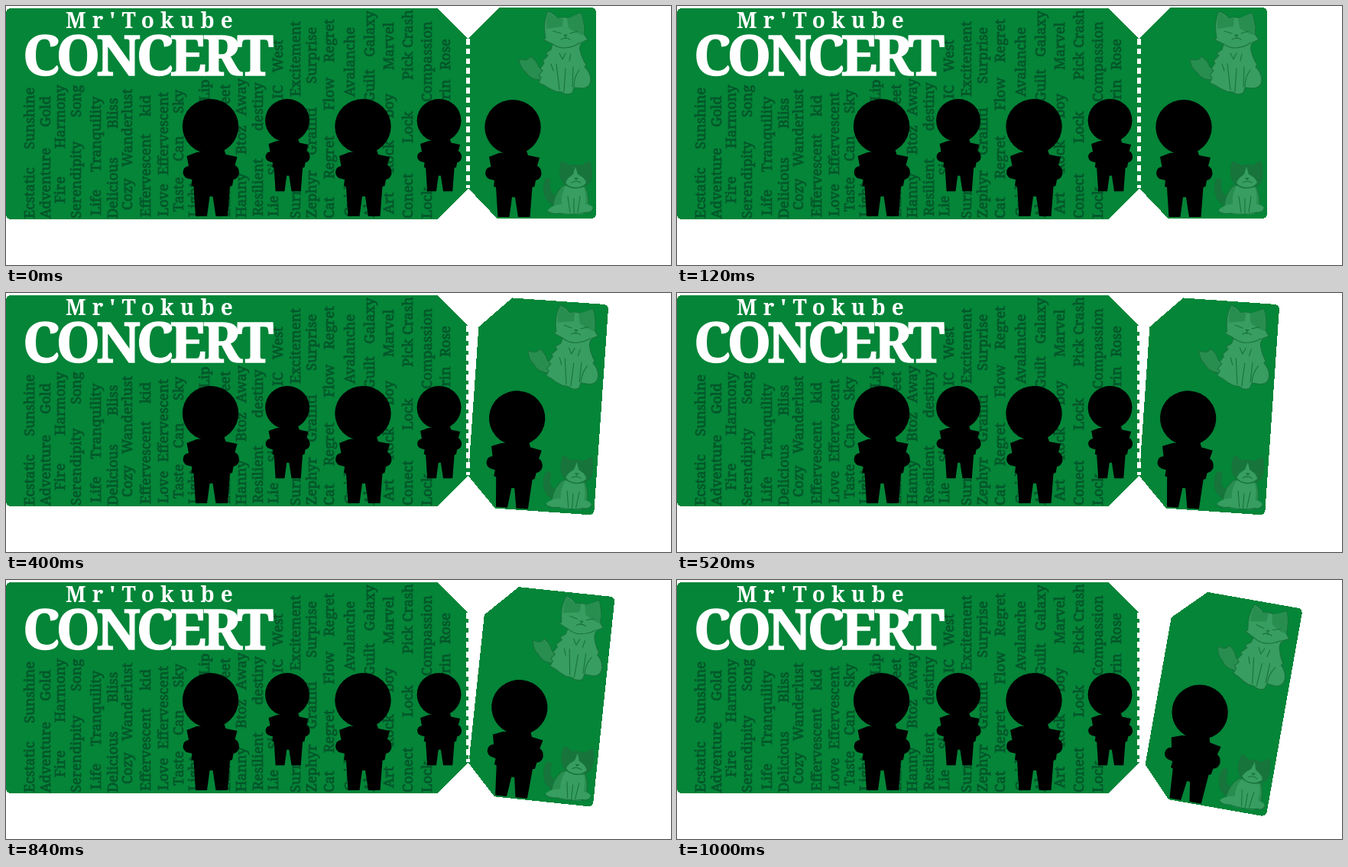
Animation of 870x340 px, one loop 1.2 s. Source, as an HTML page:

```html
<!DOCTYPE html>
<html lang="en">
<head>
<meta charset="utf-8">
<title>Concert ticket</title>
<style>
  html, body { margin: 0; width: 100%; height: 100%; overflow: hidden; background: #fff; }
  svg { display: block; width: 870px; height: 340px; }
  text { font-family: "Noto Serif", "Liberation Serif", serif; }
  .ticket { fill: #048538; shape-rendering: crispEdges; }
  .title { fill: #fff; font-weight: bold; }
  #words { fill: #03572a; stroke: #03572a; stroke-width: .8; font-size: 18.4px; }
  .cat { stroke: #18733b; stroke-width: 1.1; stroke-linejoin: round; stroke-linecap: round; }
  .light { fill: #379d60; }
  .mid { fill: #288e50; }
  .dark { fill: #17753c; }
  .patch { stroke: none; }
  .line { fill: none; }
</style>
</head>
<body>
<svg viewBox="0 0 870 340">
  <defs>
    <g id="person">
      <ellipse cy="36" rx="36.7" ry="36"/>
      <path d="M-18 70 L-31 75 -28.500 88 Q-36 89 -36 97 Q-35 104 -27 105 L-24 106 -25 114 -22 115
        -19.500 154 H-4.500 L-1 128 H3 L7 154 H22.500 L25.500 115 28.500 114 30 106
        Q37 104 37.500 97 Q37 89 32 87 L35 76 20 73 18 67Z"/>
    </g>
  </defs>

  <path class="ticket" d="M7 3 H564 L605 44 V239 L564 280 H7 Q0 280 0 273 V10 Q0 3 7 3Z"/>
  <g id="words"></g>
  <text class="title" x="78" y="29" font-size="28" letter-spacing="8">Mr'Tokube</text>
  <text class="title" x="22" y="91" font-size="73" letter-spacing="-5" stroke="#fff" stroke-width="1.500">CONCERT</text>
  <use href="#person" transform="translate(267.500 122)"/>
  <use href="#person" transform="translate(368 122) scale(.788)"/>
  <use href="#person" transform="translate(467 122)"/>
  <use href="#person" transform="translate(566.500 122) scale(.788)"/>

  <g id="stub">
    <path class="ticket" d="M604.500 43 L645.500 2 H765 Q772 2 772 9 V272 Q772 279 765 279 H642.500 L604.500 239Z"/>
    <use href="#person" transform="translate(663 123)"/>

    <g class="cat">
      <path class="mid" d="M704 97 Q686 98 680 87 Q673 82 671 70 L679 71 Q683 71 686 66 Q694 71 697 80 L704 86Z"/>
      <path class="light" d="M706 42 Q702 22 709 7 Q716 9 722 16 Q731 13 739 17 Q746 10 752 9
        Q758 25 756 37 L761 44 753 48 Q750 53 751 58 Q754 70 759 77 L757 80 Q764 86 765 96
        Q765 107 755 108 L743 107 741 114 Q734 118 727 113 L719 112 Q711 109 704 104
        L697 101 700 94 697 91 702 85 699 82 704 75 702 72 709 65 706 62 713 57 715 50 703 44Z"/>
      <path class="mid patch" d="M734 17 Q746 11 752 10 Q757 24 755 38 Q746 36 736 29Z"/>
      <path class="mid patch" d="M707 30 Q706 14 710 8 L722 17 729 15 728 27 Q718 28 707 30Z"/>
      <path class="line" d="M716 33 l10 3 M738 36 l10 -3 M730 38 h4 l-2 2z M732 40 v3 M726 44 q6 -4 12 0
        M715 50 q8 5 14 5 q12 0 22 -7 M720 76 l4 34 M732 82 l-2 30 M742 80 l-1 26 M750 84 q-7 9 -7 22
        M713 76 l3 9 M724 62 l4 8 4 -8 M739 63 l-2 9"/>
    </g>

    <g class="cat">
      <path class="dark" d="M719 262 Q706 258 704 245 Q702 235 706 227 Q710 225 712 229 Q709 247 721 250Z"/>
      <path class="mid" d="M728 236 Q717 247 716 262 L712 266 722 272 H758 L768 267 762 260 Q763 245 756 234Z"/>
      <path class="light patch" d="M732 236 Q726 247 727 260 Q712 262 708 269 Q712 274 724 272 Q731 275 743 273
        Q753 275 758 271 Q766 272 768 266 Q767 261 758 260 Q760 247 755 236Z"/>
      <path class="dark" d="M725 223 Q724 210 727 204 Q733 206 737 210 Q745 207 754 210 Q759 205 764 204
        Q767 216 766 225 Q765 237 747 239 Q729 239 725 223Z"/>
      <path class="light patch" d="M745 211 L748 221 Q757 225 759 232 Q754 238 746 238 Q736 238 732 232
        Q735 225 742 221Z"/>
      <path class="line" d="M731 220 l8 3 M752 223 l8 -3 M744 226 h4 l-2 2z M740 232 q6 -4 12 0
        M735 250 l3 21 M751 250 l-3 21 M743 253 v19 M708 269 q5 5 16 3 q19 3 34 -1 q8 1 10 -5"/>
    </g>
  </g>

  <path d="M604.500 43 V239" stroke="#fff" stroke-width="5" stroke-dasharray="7.600 5.200" shape-rendering="crispEdges"/>
</svg>
<script>
// Each column: baseline x, then words with the y where they start, reading upwards.
const columns = [
  [37, "Ecstatic", 279, "Sunshine", 188],
  [58, "Adventure", 279, "Gold", 159],
  [77, "Fire", 259, "Harmony", 187],
  [98, "Serendipity", 279, "Song", 146],
  [124, "Life", 275, "Tranquility", 218],
  [146, "Delicious", 279, "Bliss", 161],
  [165, "Cozy", 268, "Wanderlust", 211],
  [189, "Effervescent", 277, "kid", 145],
  [212, "Love", 276, "Effervescent", 222],
  [232, "Taste", 270, "Can", 204, "Sky", 141],
  [252, "Light", 277],
  [266, "Lip", 125],
  [293, "Land", 277, "eet", 129],
  [314, "Hanny", 278, "Btoz", 195, "Away", 144],
  [336, "Resilient", 276, "destiny", 164],
  [356, "Lie", 276, "Sigh", 222],
  [362, "IC", 122, "West", 87],
  [385, "Surreal", 279, "Excitement", 119],
  [406, "Zephyr", 278, "Graffiti", 196, "Surprise", 102],
  [429, "Cat", 279, "Regret", 227, "Flow", 137, "Regret", 74],
  [456, "Guide", 277, "Avalanche", 119],
  [482, "Alone", 278, "Guilt", 126, "Galaxy", 67],
  [507, "Art", 273, "Rock", 219, "boy", 147, "Marvel", 84],
  [532, "Conect", 279, "Lock", 180, "Pick", 97, "Crash", 55],
  [557, "Lock", 279, "Compassion", 126],
  [581, "Grin", 136, "Rose", 84]
];
// Poses: start time, angle, shift x, shift y.
const poses = [[0, 0, 0, 0], [200, 2, .5, 1.3], [400, 4, .3, 1], [600, 6, .9, 1.5], [1000, 10, 8.3, 3.1]];
const stub = document.getElementById("stub");

let html = "";
for (const [x, ...words] of columns)
  for (let i = 0; i < words.length; i += 2)
    html += `<text transform="translate(${x} ${words[i + 1]}) rotate(-90)">${words[i]}</text>`;
document.getElementById("words").innerHTML = html;

function draw(now) {
  const time = now % 1200;
  const [, angle, dx, dy] = poses.findLast(pose => pose[0] <= time);
  stub.setAttribute("transform", `translate(${dx} ${dy}) rotate(${angle} 604 238)`);
  requestAnimationFrame(draw);
}
draw(0);
</script>
</body>
</html>
```
